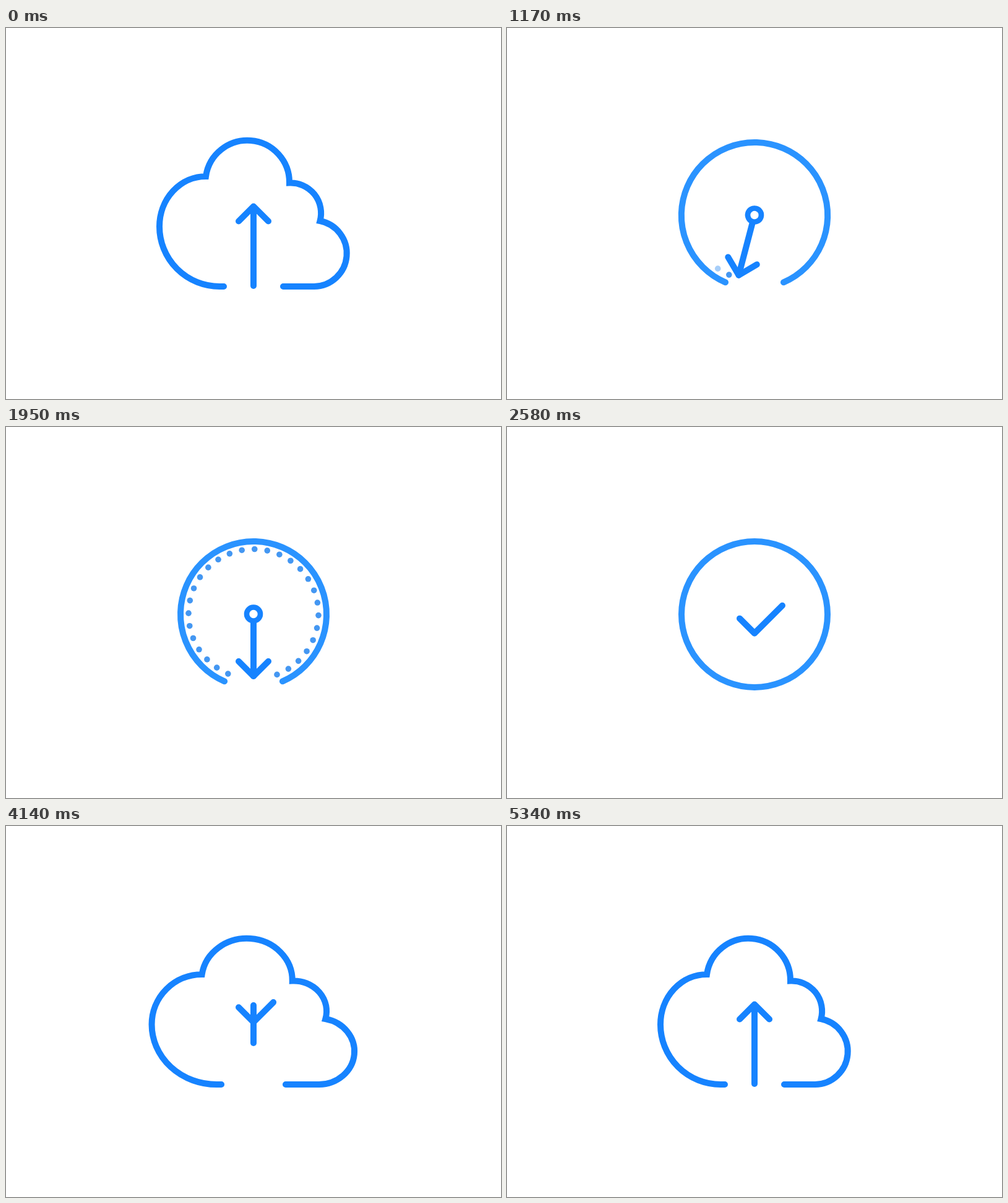
These frames come from a looping animation (800x600 px, 5580 ms). An HTML page with a canvas:

```html
<!DOCTYPE html>
<html lang="en">
<head>
<meta charset="utf-8">
<title>Cloud upload</title>
<style>
html, body { margin: 0; width: 100%; height: 100%; overflow: hidden; background: #fff; }
canvas { display: block; }
</style>
</head>
<body>
<canvas id="stage" width="800" height="600"></canvas>
<script>
const ctx = document.getElementById('stage').getContext('2d');
const LOOP = 5580, STEP = 30;
const BLUE = '#1683ff', RIM = '#2a93ff', DOT = '#4497f2';
const CX = 400, HUB_Y = 302.5, RIM_R = 118, CLOUD_R = 151.5;
const RAD = Math.PI / 180;

const cloud = new Path2D(
  'M352 418H345A97 97 0 0 1 248 321A75 81 0 0 1 323 240' +
  'A67.85 67.85 0 0 1 458 250.5A49 49 0 0 1 507.5 312A53.5 53.5 0 0 1 498 418H448');

const clamp = v => Math.max(0, Math.min(1, v));
const mix = (a, b, k) => a + (b - a) * k;
const linear = (t, start, end) => clamp((t - start) / (end - start));
function ease(t, start, end) {
  const k = linear(t, start, end);
  return k < 0.5 ? 2 * k * k : 1 - 2 * (1 - k) ** 2;
}
function elastic(t, start, dur = 1000) {
  const k = linear(t, start, start + dur);
  return k === 0 || k === 1 ? k : 1 + 2 ** (-10 * k) * Math.sin((k - 0.075) * Math.PI / 0.15);
}

function stroke(color, width, path) {
  ctx.strokeStyle = color;
  ctx.lineWidth = width;
  path ? ctx.stroke(path) : ctx.stroke();
}

function polyline(...points) {
  ctx.beginPath();
  points.forEach(([x, y]) => ctx.lineTo(x, y));
  ctx.lineJoin = 'round';
  stroke(BLUE, 10);
}

function drawOutline(t) {
  const back = t >= 4000;
  const rx = back ? mix(RIM_R, CLOUD_R, elastic(t, 4000)) : mix(CLOUD_R, RIM_R, elastic(t, 520));
  if (t < 520 || t >= 4075) {
    const scale = rx / CLOUD_R;
    const path = new Path2D();
    path.addPath(cloud, new DOMMatrix([scale, 0, 0, 1, CX * (1 - scale), 0]));
    ctx.lineJoin = 'miter';
    stroke(BLUE, 10, path);
    return;
  }
  const gap = 23.4 * RAD * (back ? ease(t, 4000, 4070) : 1 - ease(t, 2190, 2460));
  ctx.beginPath();
  ctx.ellipse(CX, 303, rx, RIM_R, 0, Math.PI / 2 + gap, Math.PI * 2.5 - gap);
  stroke(RIM, 10);
}

function drawDots(t, angle) {
  const fade = 1 - linear(t, 2010, 2190);
  if (!angle || !fade) return;
  ctx.fillStyle = DOT;
  for (let i = 0; i < 29; i++) {
    const a = 23.1 + i * 11.275;
    ctx.globalAlpha = fade * clamp((angle + 25 - a) / 11.3);
    ctx.beginPath();
    ctx.arc(CX - 105 * Math.sin(a * RAD), HUB_Y + 105 * Math.cos(a * RAD), 4.8, 0, 7);
    ctx.fill();
  }
  ctx.globalAlpha = 1;
}

function drawHead(y, turn, arm) {
  ctx.save();
  ctx.translate(CX, y);
  ctx.rotate(turn * RAD);
  polyline([-24 * arm, -12 + 24 * arm], [0, -12], [24, 12]);
  ctx.restore();
}

function drawShaft(t) {
  let top, bottom;
  if (t < 4000) {
    if (t >= 2280) return;
    top = mix(mix(290, 302, ease(t, 400, 600)), 402, ease(t, 2100, 2280));
    bottom = mix(417, 403, ease(t, 420, 800));
  } else {
    top = 290;
    bottom = mix(300, 417, ease(t, 4000, 4300));
  }
  polyline([CX, top], [CX, bottom]);
}

function drawHub(t) {
  const size = ease(t, 690, 900) * (1 - ease(t, 2100, 2250));
  if (!size) return;
  ctx.beginPath();
  ctx.arc(CX, HUB_Y, 11 * size, 0, 7);
  ctx.fillStyle = '#fff';
  ctx.fill();
  stroke(BLUE, 8.6 * size);
}

function draw(t) {
  ctx.clearRect(0, 0, 800, 600);
  ctx.lineCap = 'round';
  drawOutline(t);

  const angle = 360 * ease(t, 1050, 1890);
  drawDots(t, angle);

  ctx.save();
  ctx.translate(CX, HUB_Y);
  ctx.rotate(angle * RAD);
  ctx.translate(-CX, -HUB_Y);
  drawShaft(t);
  drawHub(t);

  const toCheck = elastic(t, 2260, 1000);
  const fromCheck = ease(t, 4000, 4240);
  const dropped = mix(300.5, 391, ease(t, 690, 930));
  const headY = mix(mix(dropped, 314, toCheck), 300.5, fromCheck);
  const turn = 180 * (elastic(t, 504) - elastic(t, 4344));
  drawHead(headY, turn, 1 + 0.97 * toCheck * (1 - fromCheck));
  ctx.restore();
}

function tick() {
  draw(Math.floor(performance.now() % LOOP / STEP) * STEP);
  requestAnimationFrame(tick);
}
tick();
</script>
</body>
</html>
```
